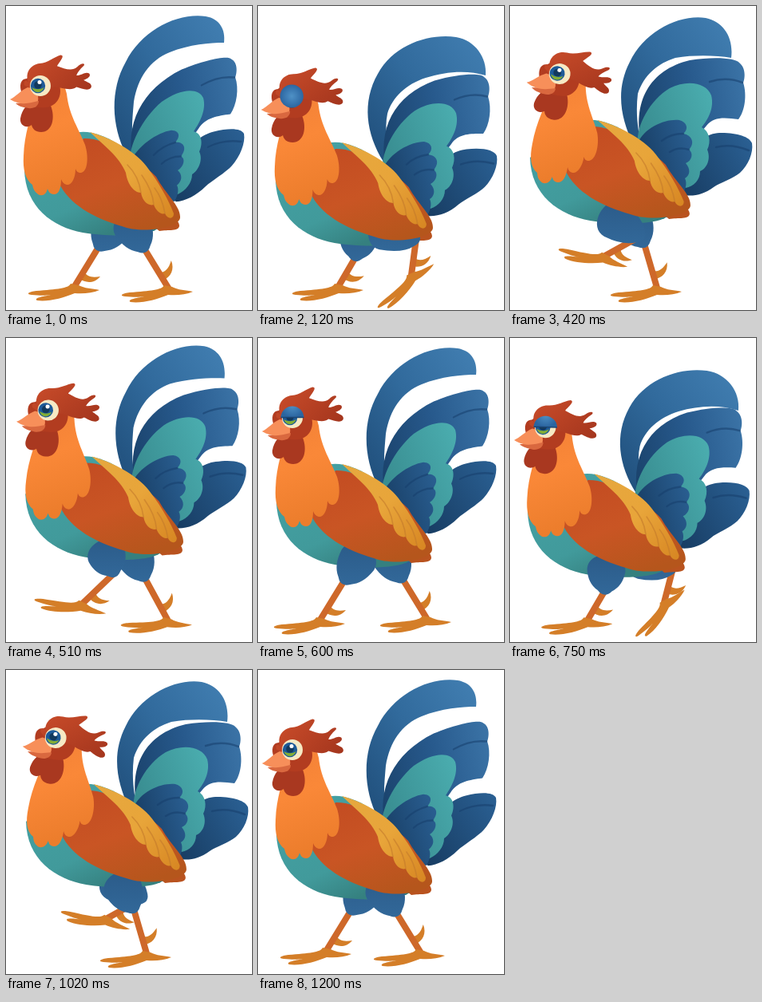
An HTML page for the animation above (1230 ms loop, 308 by 381 pixels).

```html
<!DOCTYPE html>
<html lang="en">
<head>
<meta charset="utf-8">
<title>Walking rooster</title>
<style>
html, body { margin: 0; width: 100%; height: 100%; overflow: hidden; background: #fff; }
svg { display: block; width: 100vw; height: 100vh; }
.thigh { fill: url(#thighFill); }
.shank { fill: none; stroke: #ce682a; stroke-width: 8; stroke-linecap: round; }
.foot, .spur { fill: #d47e28; }
.crease { fill: none; stroke: #173f6c; stroke-width: 2.5; stroke-linecap: round; opacity: .55; }
.fold { fill: none; stroke: #c47b2c; stroke-width: 1.6; stroke-linecap: round; opacity: .6; }
</style>
</head>
<body>
<svg viewBox="0 0 308 381" xmlns="http://www.w3.org/2000/svg">
  <defs>
    <linearGradient id="plumeFill" x1="0" y1=".8" x2="1" y2="0">
      <stop offset="0" stop-color="#22527f"/><stop offset=".45" stop-color="#316a9c"/><stop offset="1" stop-color="#427fb2"/>
    </linearGradient>
    <linearGradient id="blue" x1="0" y1=".5" x2="1" y2=".3">
      <stop offset="0" stop-color="#1b446e"/><stop offset=".5" stop-color="#27598c"/><stop offset="1" stop-color="#3a72a5"/>
    </linearGradient>
    <linearGradient id="navy" x1="0" y1=".6" x2="1" y2=".2">
      <stop offset="0" stop-color="#173c62"/><stop offset="1" stop-color="#2a5f92"/>
    </linearGradient>
    <linearGradient id="teal" x1="0" y1=".7" x2="1" y2=".2">
      <stop offset="0" stop-color="#36888c"/><stop offset="1" stop-color="#4aacae"/>
    </linearGradient>
    <linearGradient id="chest" x1="0" y1="0" x2=".6" y2="1">
      <stop offset="0" stop-color="#45a2a5"/><stop offset=".7" stop-color="#419a9b"/><stop offset="1" stop-color="#35807f"/>
    </linearGradient>
    <linearGradient id="wing" x1=".2" y1="0" x2=".7" y2="1">
      <stop offset="0" stop-color="#c34c22"/><stop offset=".5" stop-color="#c95524"/><stop offset="1" stop-color="#b5561c"/>
    </linearGradient>
    <linearGradient id="gold" x1="0" y1="0" x2="1" y2="1">
      <stop offset="0" stop-color="#e6a83f"/><stop offset=".5" stop-color="#e8a53a"/><stop offset="1" stop-color="#d78622"/>
    </linearGradient>
    <linearGradient id="neckFill" x1="0" y1="0" x2=".2" y2="1">
      <stop offset="0" stop-color="#f17f37"/><stop offset=".5" stop-color="#fa8838"/><stop offset="1" stop-color="#ec7d2c"/>
    </linearGradient>
    <linearGradient id="red" x1="0" y1="0" x2="1" y2="1">
      <stop offset="0" stop-color="#c94c2a"/><stop offset="1" stop-color="#a3351d"/>
    </linearGradient>
    <linearGradient id="thighFill" x1="0" y1="0" x2="0" y2="1">
      <stop offset="0" stop-color="#2b5b89"/><stop offset="1" stop-color="#326899"/>
    </linearGradient>
    <radialGradient id="lidFill">
      <stop offset="0" stop-color="#4f91c6"/><stop offset="1" stop-color="#2b65a0"/>
    </radialGradient>
    <clipPath id="eyeball"><circle cx="43" cy="100" r="14.5"/></clipPath>
  </defs>

  <g id="far"></g>

  <path id="top" fill="url(#plumeFill)"/>
  <g id="tail">
    <path fill="url(#blue)" d="M165 175C152 120 175 80 225 68C255 63 283 65 287 71C296 78 294 92 292 96C297 112 294 132 286 142C270 140 255 138 246 150L200 205Z"/>
    <path class="crease" d="M291 96C276 90 262 91 250 95"/>
    <path fill="url(#navy)" d="M225 190C235 165 250 159 265 159C285 159 300 164 303 172C305 184 298 200 288 209C280 216 262 222 255 227C243 236 230 239 218 237C205 225 198 210 200 195Z"/>
    <path class="crease" d="M299 181C284 175 270 174 258 177"/>
    <path fill="url(#teal)" d="M160 172C158 150 175 118 200 103C222 92 246 96 252 112C256 128 248 142 240 152C250 157 252 170 247 180C252 192 246 204 238 207C238 218 230 226 220 228L205 215L190 165Z"/>
    <path fill="url(#navy)" d="M160 172C168 152 195 141 212 143C222 146 224 154 217 160C228 162 232 172 224 180C230 184 228 194 220 197C226 204 226 212 219 216C222 222 220 230 216 236L190 225Z"/>
    <path class="crease" d="M217 160C206 160 196 164 190 169M224 180C214 177 206 179 200 183"/>
  </g>

  <g class="body">
    <path fill="#b9531f" d="M170 264C195 256 216 264 217 275C217 283 203 280 192 282Z"/>
    <path fill="url(#chest)" d="M85 160C97 154 125 160 150 180C180 210 196 250 190 279C175 290 125 289 96 284C58 277 24 252 23 205Z"/>
  </g>

  <g id="near"></g>

  <g class="body">
    <path fill="url(#wing)" d="M97 166C125 165 165 190 188 214C200 236 218 250 218 264C220 278 170 286 145 276C110 266 78 248 66 221C75 205 88 185 97 166Z"/>
    <path fill="url(#gold)" d="M105 158C128 164 160 180 176 201C192 222 204 244 210 260C210 268 202 267 199 260C194 262 188 257 185 249C178 251 171 245 169 234C160 234 152 223 150 209C142 189 122 174 105 158Z"/>
    <path class="fold" d="M185 249C184 236 177 222 170 212M169 234C167 219 160 207 152 199M199 260C197 248 192 236 186 228"/>
    <path id="neck" fill="url(#neckFill)" d="M42 90C58 82 72 90 76 110C79 138 92 155 99 174C104 190 102 208 94 209C90 209 88 207 87 204C87 216 82 225 76 224C72 223 70 220 69 217C69 229 66 236 60 236C55 236 53 232 52 229C50 238 43 239 39 235C35 232 34 228 33 224C24 217 21 205 22 188C23 160 31 140 36 118Z"/>
    <g id="head">
      <path fill="#a93820" d="M24 127L56 125C62 140 58 158 44 158C37 158 33 154 32 149C26 154 17 150 18 141C19 135 21 131 24 127Z"/>
      <path fill="#b23c20" d="M20 110C16 100 18 91 26 91C36 82 60 82 66 97C72 111 64 126 50 127C36 129 25 122 20 110Z"/>
      <path id="comb" fill="url(#red)" d="M24 94C24 88 28 88 30 92C28 80 38 71 50 73C60 75 70 70 78 70C84 72 74 78 70 82C78 88 86 94 94 90C100 86 106 88 102 91C96 94 92 97 90 100C96 102 102 98 106 102C108 106 102 108 97 108C100 112 106 114 104 119C100 124 92 118 86 114C78 118 66 108 58 106L30 100Z"/>
      <path fill="#d9683f" d="M12 122C20 122 32 118 41 119C41 126 34 129 28 128C22 127 16 126 12 122Z"/>
      <path fill="#f78f5a" d="M5 117C12 114 18 106 27 102C36 103 42 111 40 119C31 121 20 126 5 117Z"/>
      <circle cx="43" cy="100" r="13" fill="#f6e9c4"/>
      <circle cx="40" cy="100" r="9.2" fill="#1d5a98"/>
      <path fill="#83ad35" d="M32.5 102C35 110 45 110 47.500 102C43 105 37 105 32.500 102Z"/>
      <circle cx="40" cy="99" r="4.800" fill="#12395d"/>
      <circle cx="42" cy="95.500" r="2.500" fill="#fff"/>
      <g clip-path="url(#eyeball)">
        <g id="lid">
          <rect x="28" y="85" width="30" height="30" fill="url(#lidFill)"/>
          <path d="M28 115H58" stroke="#1c4674" stroke-width="1.500"/>
        </g>
      </g>
    </g>
  </g>
</svg>

<script>
const LOOP = 1230, STRIDE = 1200, STEP = 600, TICK = 30;
const $ = id => document.getElementById(id);

// time, body x y stretch, neck lean, head tilt, comb angle, tail x y, tail scale y, tail droop
const bodyKeys = [
  [0,   0, 0,   1,     0,   0,  -16, -5, 15, .97, -.26],
  [120, -1, 13, 1.01,  0,   0,  -10, -4, 29, 1,   -.12],
  [300, 0, -2,  1.035, .13, 14, -6,  0,  15, 1,   .08],
  [420, 2, -15, 1.03,  .14, 9,  -5,  0,  0,  1,   0]
];

// time, hip, knee, ankle, foot angle, toe reach; starts with the foot trailing on the ground
const legKeys = [
  [0,    158, 276, 173, 304, 203, 353, 0,   1],
  [120,  158, 282, 198, 292, 192, 337, -35, 1],
  [300,  158, 268, 168, 290, 142, 314, -52, .65],
  [420,  130, 268, 164, 288, 119, 313, 17,  1],
  [600,  125, 278, 108, 304, 78,  353, 0,   1],
  [720,  118, 292, 114, 317, 93,  353, 0,   1],
  [900,  142, 278, 148, 307, 124, 355, 0,   1],
  [1020, 146, 272, 160, 300, 176, 355, 0,   1]
];

// top plume outline at the four body keys
const plume = [
  "M150 185C132 150 130 105 150 70C170 30 215 8 250 13C268 16 275 30 273 46C255 46 230 48 205 58C180 68 165 90 160 120C158 145 155 170 165 190Z",
  "M157 195C135 160 130 120 150 85C170 48 215 34 248 39C272 43 287 65 285 87C262 80 235 82 210 90C185 98 168 115 162 135C158 155 162 175 170 195Z",
  "M160 185C140 150 134 120 146 92C165 55 205 36 238 38C272 41 292 65 285 92C268 84 240 80 215 86C190 93 172 105 165 128C160 150 165 170 170 190Z",
  "M155 175C138 140 132 105 150 70C168 32 212 10 245 15C268 20 280 40 277 65C258 62 232 61 207 65C185 72 168 86 160 110C157 135 160 160 167 180Z"
];
const plumeKeys = plume.map((d, i) => [bodyKeys[i][0], ...d.match(/\d+/g).map(Number)]);

const blinkKeys = [[0, 0], [90, 1], [165, 1], [255, 0], [555, 0], [645, 1], [705, 1], [795, 0], [LOOP, 0]];

// Smooth periodic curve through the keys
function spline(keys, period, t) {
  t %= period;
  const n = keys.length;
  const key = i => keys[(i + n) % n];
  const time = i => key(i)[0] + Math.floor(i / n) * period;
  let i = n - 1;
  while (keys[i][0] > t) i--;
  const [ta, tb, tc, td] = [i - 1, i, i + 1, i + 2].map(time);
  const h = tc - tb, u = (t - tb) / h, v = 1 - u;
  return key(i).slice(1).map((b, j) => {
    const [a, c, d] = [i - 1, i + 1, i + 2].map(m => key(m)[j + 1]);
    const mb = (c - a) / (tc - ta) * h, mc = (d - b) / (td - tb) * h;
    return b * (1 + 2 * u) * v * v + mb * u * v * v + c * u * u * (3 - 2 * u) - mc * u * u * v;
  });
}

function linear(keys, t) {
  const i = keys.findIndex(k => k[0] > t);
  const [ta, a] = keys[i - 1], [tb, b] = keys[i];
  return a + (b - a) * (t - ta) / (tb - ta);
}

function makeLeg(id) {
  const add = (cls, d) => {
    const p = document.createElementNS("http://www.w3.org/2000/svg", "path");
    p.setAttribute("class", cls);
    if (d) p.setAttribute("d", d);
    return $(id).appendChild(p);
  };
  return {
    spur: add("spur", "M0 -22C7 -18 13 -20 21 -27C19 -15 10 -10 0 -11Z"),
    shank: add("shank"),
    foot: add("foot", "M-5 -3C-8 3 -22 4 -48 6C-57 7 -62 10 -54 11C-44 12 -36 12 -30 11C-40 13 -52 15 -47 18C-34 20 -14 15 0 9C10 10 22 9 31 5C22 3 12 3 5 -1Z"),
    thigh: add("thigh")
  };
}

function poseLeg(leg, t, dx, dy) {
  const [hx, hy, kx, ky, ax, ay, turn, reach] = spline(legKeys, STRIDE, t);
  const len = Math.hypot(kx - hx, ky - hy), ux = (kx - hx) / len, uy = (ky - hy) / len;
  const at = (along, side) =>
    (hx + dx + ux * along - uy * side).toFixed(1) + " " + (hy + dy + uy * along + ux * side).toFixed(1);
  leg.thigh.setAttribute("d",
    `M${at(0, 24)}Q${at(len * .7, 22)} ${at(len, 9)}Q${at(len + 10, 0)} ${at(len, -9)}` +
    `Q${at(len * .7, -22)} ${at(0, -24)}C${at(-26, -24)} ${at(-26, 24)} ${at(0, 24)}Z`);
  leg.shank.setAttribute("d", `M${kx + dx} ${ky + dy}L${ax + dx} ${ay + dy}`);
  const tilt = Math.atan2(kx - ax, ay - ky) * 180 / Math.PI;
  const place = a => `translate(${ax + dx} ${ay + dy}) rotate(${a})`;
  leg.spur.setAttribute("transform", place(tilt));
  leg.foot.setAttribute("transform", `${place(turn)} scale(${reach} 1)`);
}

const near = makeLeg("near"), far = makeLeg("far");
const bodies = document.querySelectorAll(".body");

function draw(now) {
  const t = Math.floor(now % LOOP / TICK) * TICK;
  const [x, y, stretch, lean, tilt, comb, tx, ty, sy, droop] = spline(bodyKeys, STEP, t);

  bodies.forEach(b => b.setAttribute("transform",
    `translate(${22 + x} ${y}) scale(${stretch} 1) translate(-22 0)`));
  $("neck").setAttribute("transform", `matrix(1 0 ${-lean} 1 ${215 * lean} 0)`);
  $("head").setAttribute("transform", `translate(${115 * lean} 0) rotate(${tilt} 43 100)`);
  $("comb").setAttribute("transform", `rotate(${comb} 43 100)`);
  $("tail").setAttribute("transform",
    `translate(${195 + tx} ${215 + ty}) matrix(1 ${droop} 0 ${sy} 0 0) translate(-195 -215)`);

  const p = spline(plumeKeys, STEP, t);
  let i = 0;
  $("top").setAttribute("d", plume[0].replace(/\d+/g, () => p[i++].toFixed(1)));

  $("lid").setAttribute("transform", `translate(0 ${-31 * (1 - linear(blinkKeys, t))})`);

  poseLeg(near, t, 0, 0);
  poseLeg(far, t + STEP, 8, -2);
  requestAnimationFrame(draw);
}
requestAnimationFrame(draw);
</script>
</body>
</html>
```
